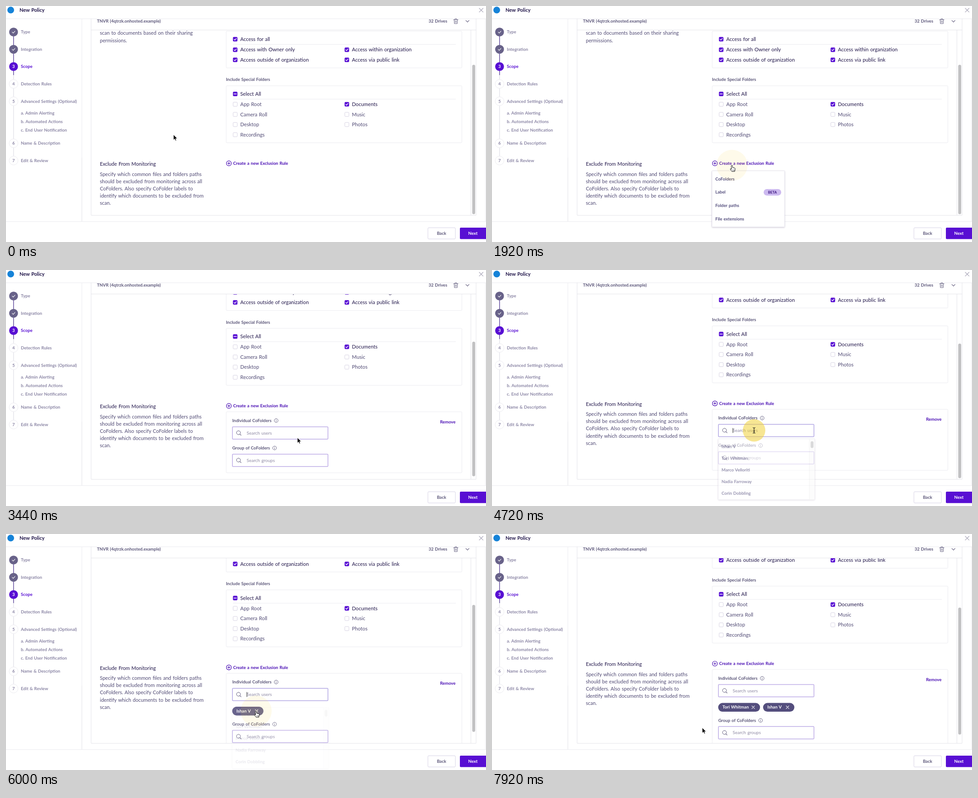
Write an HTML page that moves like this. It is 1066 px wide and 526 px high and loops after 8 s.

```html
<!DOCTYPE html>
<html lang="en">
<head>
<meta charset="utf-8">
<title>New Policy</title>
<style>
  html, body { margin: 0; width: 100%; height: 100%; overflow: hidden; background: #fff; }
  svg { display: block; width: 100vw; height: 100vh; }
  text { font-family: Lato, "Open Sans", sans-serif; font-size: 11.25px; word-spacing: .07em; }
  .copy { font-size: 11.1px; }
  .label { font-size: 9.55px; font-weight: 700; }
  .title { font-size: 11px; font-weight: 700; }
  .hint { font-size: 10px; }
  .mid { text-anchor: middle; }
</style>
</head>
<body>
<svg id="stage" viewBox="0 0 1066 526" preserveAspectRatio="none">
  <defs>
    <clipPath id="view"><rect x="189" y="54" width="843" height="412"/></clipPath>
    <filter id="shadow" x="-10%" y="-10%" width="120%" height="125%">
      <feDropShadow dx="0" dy="1" stdDeviation="1.5" flood-color="#2a2050" flood-opacity=".25"/>
    </filter>
  </defs>
</svg>
<script>
const NS = "http://www.w3.org/2000/svg";
const stage = document.getElementById("stage");
const PURPLE = "#580fd3", LINK = "#4a0fb4", INK = "#21164a", BODY = "#504a74", LABEL = "#5b5679",
      MUTED = "#8b86a5", RULE = "#ebebf0", HINT = "#8e89a4", TAG = "#544e7d";
const LOOP = 8000, STEP = 80;

function el(parent, name, attrs) {
  const node = document.createElementNS(NS, name);
  for (const key in attrs) node.setAttribute(key, attrs[key]);
  return parent.appendChild(node);
}
const group = (parent, attrs = {}) => el(parent, "g", attrs);
const box = (parent, x, y, width, height, fill, stroke = "none", rx = 0, more = {}) =>
  el(parent, "rect", { x, y, width, height, fill, stroke, rx, ...more });
const path = (parent, d, stroke, width = 1, fill = "none") =>
  el(parent, "path", { d, stroke, fill, "stroke-width": width, "stroke-linecap": "round", "stroke-linejoin": "round" });
const line = (parent, x1, y1, x2, y2, stroke = RULE, width = 1) =>
  el(parent, "line", { x1, y1, x2, y2, stroke, "stroke-width": width });
const circle = (parent, cx, cy, r, fill, stroke = "none", width = 1) =>
  el(parent, "circle", { cx, cy, r, fill, stroke, "stroke-width": width });

// y is the middle of the line of text
function text(parent, x, y, words, fill, style = "") {
  const small = /label|hint/.test(style);
  const node = el(parent, "text", { x, y: y + (small ? 3.4 : 3.9), fill, class: style });
  node.textContent = words;
  return node;
}
const paragraph = (parent, x, y, lines) =>
  lines.forEach((words, i) => text(parent, x, y + i * 16.1, words, BODY, "copy"));

function checkbox(parent, x, y, words, state) {
  const on = state !== "off";
  box(parent, x - 4.6, y - 4.6, 9.2, 9.2, on ? PURPLE : "#fff", on ? PURPLE : "#d3cfe0", 1.6, { "stroke-width": .9 });
  if (state === "on") path(parent, `M${x - 2.6} ${y + .1}l1.9 1.9 3.4-3.9`, "#fff", 1.3);
  if (state === "some") path(parent, `M${x - 2.8} ${y}h5.6`, "#fff", 1.5);
  text(parent, x + 11.3, y, words, on ? INK : BODY);
}
function info(parent, x, y) {
  circle(parent, x, y, 4.2, "none", LABEL, .9);
  path(parent, `M${x} ${y - .3}v2.3M${x} ${y - 2.1}v.1`, LABEL, .9);
}
function searchField(parent, y, words) {
  const frame = box(parent, 502.8, y - 13.8, 212.2, 27.6, "#fff", "#bcabe6", 1.5, { "stroke-width": 1.5 });
  circle(parent, 516.3, y - .6, 4.3, "none", LABEL);
  path(parent, `M519.5 ${y + 2.6}l2.6 2.6`, LABEL, 1.1);
  text(parent, 534.5, y, words, HINT, "hint");
  return frame;
}
function tag(parent, width, words) {
  const g = group(parent);
  box(g, 0, 438.3, width, 19.4, TAG, "none", 9.7);
  text(g, 9.5, 447.8, words, "#fff", "label");
  path(g, `M${width - 18.2} 444.8l6 6m0-6l-6 6`, "#fff", 1.1);
  return g;
}

// Scrolling content
const view = group(stage, { "clip-path": "url(#view)" });
const content = group(view);
paragraph(content, 208.5, 60.5, ["scan to documents based on their sharing", "permissions."]);
box(content, 489, 56, 523.5, 82, "#fff", RULE, 2);
line(content, 504, 85.5, 999, 85.5);
[[509, 74, "Access for all"], [509, 97.5, "Access with Owner only"], [757, 97.5, "Access within organization"],
 [509, 120, "Access outside of organization"], [757, 120, "Access via public link"]]
  .forEach(([x, y, words]) => checkbox(content, x, y, words, "on"));
text(content, 488.5, 164, "Include Special Folders", LABEL, "label");
box(content, 489, 177.8, 523.5, 127, "#fff", RULE, 2);
checkbox(content, 509, 196, "Select All", "some");
line(content, 504, 207.5, 999, 207.5);
["App Root", "Camera Roll", "Desktop", "Recordings"].forEach((words, i) => checkbox(content, 509, 219 + i * 22.6, words, "off"));
["Documents", "Music", "Photos"].forEach((words, i) => checkbox(content, 757, 219 + i * 22.6, words, i ? "off" : "on"));
text(content, 208.5, 352, "Exclude From Monitoring", INK, "copy");
paragraph(content, 208.5, 374.7, ["Specify which common files and folders paths", "should be excluded from monitoring across all",
  "CoFolders. Also specify CoFolder labels to", "identify which documents to be excluded from", "scan."]);
circle(content, 495, 350.7, 5.5, "none", LINK, 1.2);
path(content, "M492.3 350.7h5.4M495 348v5.4", LINK, 1.2);
text(content, 504.5, 350.5, "Create a new Exclusion Rule", LINK, "label");

const panel = group(content);
const panelFrame = box(panel, 489, 363.7, 523.5, 136, "#fff", RULE, 2);
text(panel, 502.5, 383.3, "Individual CoFolders", LABEL, "label");
info(panel, 600, 383.3);
text(panel, 964, 386.3, "Remove", LINK, "label");
const userField = searchField(panel, 411, "Search users");
const caret = line(panel, 535, 405.5, 535, 416.5, "#222");
const firstTag = tag(panel, 69.5, "Ishan V");
const newTag = tag(panel, 93, "Tori Whitman");
newTag.setAttribute("transform", "translate(502.3 0)");
const groups = group(panel);
text(groups, 502.5, 444.4, "Group of CoFolders", LABEL, "label");
info(groups, 596.5, 444.5);
searchField(groups, 472, "Search groups");

// Fixed frame
line(stage, 0, 28.5, 1066, 28.5);
line(stage, 168.5, 28, 168.5, 480);
line(stage, 168.5, 338, 168.5, 480, "#e2e2e8");
line(stage, 1064.8, 28, 1064.8, 480);
path(stage, "M189 28V466.5H1044V28M189 53.5H1044M1032.5 54V466", "#e4e4ea");
line(stage, 0, 480.5, 1066, 480.5);
const thumb = box(stage, 1035.4, 131, 6.6, 333, "#c1c1c3", "none", 3.3);
circle(stage, 10.5, 9, 7.5, "#1683d8");
text(stage, 30, 9.3, "New Policy", INK, "title");
path(stage, "M1051 5l8.6 8.6m0-8.6l-8.6 8.6", "#a5a2b5", 1.1);
text(stage, 202, 33.7, "TNVR (4qtrzk.onhosted.example)", LABEL, "label");
text(stage, 938.5, 33.7, "32 Drives", LABEL, "label");
path(stage, "M994 30.5h10M995.2 30.5l.6 8.8h6.4l.6-8.8M997 30.3v-1.7h4v1.7M997.9 33v4M1000.1 33v4", LABEL, .9);
path(stage, "M1021.2 32.2l3.6 3.6 3.6-3.6", LABEL, 1.1);

line(stage, 16.8, 58, 16.8, 154, "#49318f", 1.3);
line(stage, 16.8, 154, 16.8, 344, "#dedde5", 1.2);
[[58, "Type"], [96.5, "Integration"], [135, "Scope"], [173.7, "Detection Rules"], [212.3, "Advanced Settings (Optional)"],
 [306, "Name & Description"], [344.5, "Edit & Review"]].forEach(([y, words], i) => {
  circle(stage, 16.8, y, 9.8, i < 2 ? "#686289" : i === 2 ? PURPLE : "#fff", i > 2 ? "#ecebf0" : "none");
  if (i < 2) path(stage, `M13.8 ${y + .2}l2.2 2.1 3.9-4.2`, "#fff", 1.1);
  else text(stage, 16.8, y, i + 1, i === 2 ? "#fff" : MUTED, "label mid");
  text(stage, 33, y, words, i === 2 ? PURPLE : MUTED, "label");
});
["a. Admin Alerting", "b. Automated Actions", "c. End User Notification"]
  .forEach((words, i) => text(stage, 33, 238.3 + i * 19.3, words, MUTED, "label"));
box(stage, 937, 494.2, 61, 25, "#fff", "#d6d1e5", 2);
text(stage, 967.3, 506.3, "Back", LABEL, "label mid");
box(stage, 1008, 494, 60, 25.5, PURPLE, "none", 2);
text(stage, 1037, 506.3, "Next", "#fff", "label mid");

// Floating lists
const ruleMenu = group(stage);
box(ruleMenu, 488.7, 367.3, 161, 125, "#fff", "#e6e4ee", 1, { filter: "url(#shadow)" });
["CoFolders", "Label", "Folder paths", "File extensions"]
  .forEach((words, i) => text(ruleMenu, 496, 385.3 + i * 29.6, words, TAG, "label"));
box(ruleMenu, 603.3, 408, 39, 14.4, "#ccb9ef", "none", 7.2);
text(ruleMenu, 622.8, 414.9, "BETA", "#39147f", "label mid").style.fontSize = "8px";

const userList = group(stage);
box(userList, 502.5, 379.5, 214, 135.5, "#fff", "#e6e4ee", 1, { filter: "url(#shadow)" });
box(userList, 704.5, 379.5, 12, 135.5, "#fafafa", "#e9e9ec", 0, { "stroke-width": .8 });
box(userList, 707.6, 385, 6.4, 15, "#c1c1c3", "none", 3.2);
const userRows = ["Ishan V", "Tori Whitman", "Marco Velloriti", "Nadia Farroway", "Corin Dobbling"]
  .map((words, i) => text(userList, 509.8, 397.2 + i * 25.8, words, TAG, "label"));

// Pointer; every shape has its hot spot at 0,0
const ripple = circle(stage, 0, 0, 25, "#f0d030");
const pointer = group(stage);
const shapes = { arrow: group(pointer), hand: group(pointer), beam: group(pointer) };
path(shapes.arrow, "M0 0V11.6L2.7 9.1 4.5 13.2 6.4 12.4 4.7 8.4H8.2Z", "#fff", .7, "#000");
path(shapes.hand, "M-1.4 .8Q0-.8 1.2.8V5L5.8 6Q7.2 6.5 7 8.4L6 13.8H-.2L-3.6 9.2Q-4.4 7.6-2.8 7.6L-1.4 8.8Z", "#111", 1, "#fff");
path(shapes.hand, "M1.5 10v2.2M3.3 10v2.2M5 10v2.2", "#333", .6);
path(shapes.beam, "M-2.5-6Q0-6 0-4.5Q0-6 2.5-6M0-4.5V4.5M-2.5 6Q0 6 0 4.5Q0 6 2.5 6M-1.3 1.5H1.3", "#111", 1.1);
const blocked = group(pointer);
circle(blocked, 7.5, 18.5, 6.2, "#f4f4f4", "#a9a9ab", 1.8);
path(blocked, "M3.3 14.3l8.4 8.4", "#a9a9ab", 1.8);

const route = [[80, 372, 287], [1360, 533, 355], [1920, 533, 355], [2480, 524, 386], [3040, 524, 386], [3520, 657, 373],
  [4160, 596, 358], [4240, 596, 358], [4560, 582, 357.5], [4720, 582, 357.5], [5520, 561, 391], [5680, 555.5, 394.5],
  [6000, 555.5, 394.5], [6400, 576, 358], [6640, 576, 358], [7040, 568, 386], [7360, 546, 420], [7520, 546, 420],
  [7920, 467, 432]];
const kinds = [[0, "arrow"], [1600, "hand"], [2880, "arrow"], [3840, "beam"], [4960, "arrow"], [5360, "hand"],
  [6160, "arrow"], [6240, "beam"], [6960, "arrow"], [7200, "hand"], [7680, "arrow"]];
const clicks = [1760, 2720, 4720, 5840, 6560, 7520];

const clamp = v => Math.max(0, Math.min(1, v));
const ramp = (t, from, to) => clamp((t - from) / (to - from));
const ease = p => p * p * (3 - 2 * p);
const show = (node, on) => node.setAttribute("display", on ? "inline" : "none");
const move = (node, x, y) => node.setAttribute("transform", `translate(${x} ${y})`);

function pointerAt(t) {
  const i = route.findIndex(stop => stop[0] > t);
  if (i === 0) return route[0].slice(1);
  if (i < 0) return route[route.length - 1].slice(1);
  const [t0, x0, y0] = route[i - 1], [t1, x1, y1] = route[i];
  const p = ease(ramp(t, t0, t1));
  return [x0 + (x1 - x0) * p, y0 + (y1 - y0) * p];
}

function fadeList(node, alpha, dy) {
  show(node, alpha > 0);
  node.setAttribute("opacity", alpha);
  move(node, 0, dy);
}

function render(t) {
  const hasPanel = t >= 2800, tagged = t >= 5920, second = t >= 7600;
  const scroll = 53.3 * ease(ramp(t, 3120, 3520)) + 8.4 * ease(ramp(t, 7600, 7920));
  move(content, 0, -scroll);
  thumb.setAttribute("y", hasPanel ? (tagged ? 120.2 + scroll * .71 : 124 + scroll * .75) : 131);
  thumb.setAttribute("height", hasPanel ? (tagged ? 283 : 300) : 333);

  show(panel, hasPanel);
  panelFrame.setAttribute("height", tagged ? 168.6 : 136);
  move(groups, 0, tagged ? 32.6 : 0);
  show(firstTag, tagged);
  move(firstTag, second ? 602 : 502.3, 0);
  show(newTag, second);
  const focused = t >= 4720 && t < 7680;
  show(caret, focused);
  userField.setAttribute("stroke", focused ? "#b1a6e4" : "#bcabe6");

  fadeList(ruleMenu, ramp(t, 1680, 1840) * (1 - ramp(t, 2720, 2880)), 0);
  const reopened = t >= 6400;
  const opened = reopened ? ramp(t, 6500, 6720) : ramp(t, 4590, 4810);
  const closed = reopened ? ramp(t, 7520, 7700) : ramp(t, 5840, 6022);
  fadeList(userList, opened * (1 - closed), opened < 1 ? -8 * (1 - opened) : 8 * closed);
  userRows[0].setAttribute("fill", tagged ? "#b5b2c2" : TAG);

  const [x, y] = pointerAt(t);
  move(pointer, x, y);
  const kind = kinds.filter(([from]) => from <= t).pop()[1];
  for (const name in shapes) show(shapes[name], name === kind);
  show(blocked, t >= 2880 && t < 3360);

  const start = clicks.find(c => t >= c && t < c + 240);
  show(ripple, start !== undefined);
  if (start !== undefined) {
    const p = (t - start) / 160;
    ripple.setAttribute("r", 25 + 9.5 * p);
    ripple.setAttribute("opacity", Math.max(0, .52 - .42 * p));
    move(ripple, x, y);
  }
}

const begin = performance.now();
function tick() {
  const elapsed = (performance.now() - begin) % LOOP;
  render(Math.floor(elapsed / STEP) * STEP);
  requestAnimationFrame(tick);
}
tick();
</script>
</body>
</html>
```
